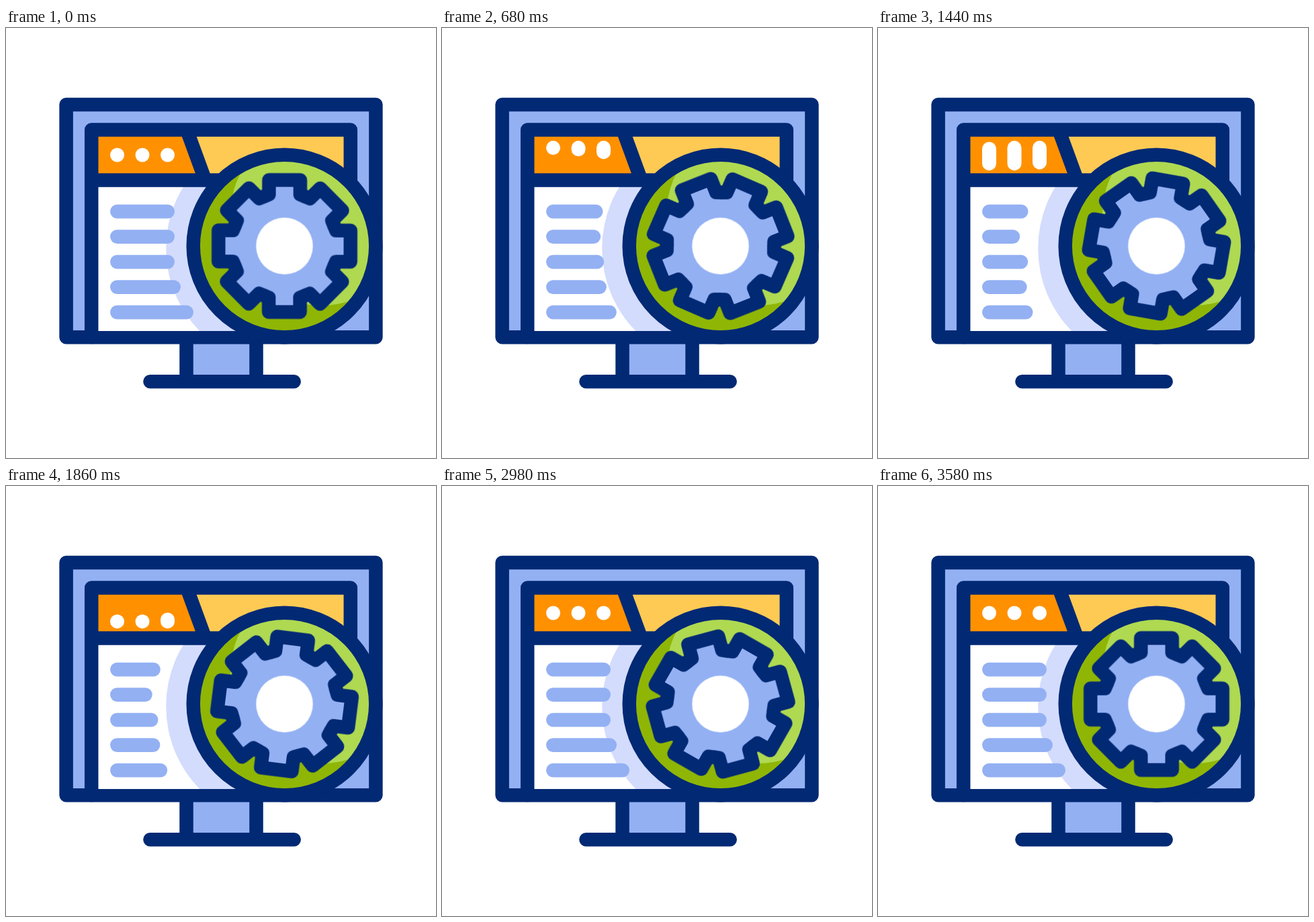
These frames come from a looping animation (640x640 px, 3600 ms). An HTML page without scripts:

```html
<!DOCTYPE html>
<html lang="en">
<head>
<meta charset="utf-8">
<title>Settings monitor</title>
<style>
  html, body { margin: 0; width: 100%; height: 100%; overflow: hidden; background: #fff; }
  svg { display: block; width: 100vw; height: 100vh; }

  .ink { stroke: #022974; stroke-width: 20.5; stroke-linejoin: round; stroke-linecap: round; fill: none; }
  .blue { fill: #93b0f3; }
  .dots { fill: #fff; }

  .gear { animation: spin 3.6s linear infinite; }
  .dots rect, .lines rect { animation: 3.6s cubic-bezier(.333, 0, .667, 1) infinite; }
  .dots rect { animation-name: hop; }
  .dots rect:nth-child(2) { animation-delay: 80ms; }
  .dots rect:nth-child(3) { animation-delay: 160ms; }
  .lines rect:nth-child(1) { animation-name: line1; }
  .lines rect:nth-child(2) { animation-name: line2; }
  .lines rect:nth-child(3) { animation-name: line3; }
  .lines rect:nth-child(4) { animation-name: line4; }
  .lines rect:nth-child(5) { animation-name: line5; }

  @keyframes spin { 99.44%, 100% { transform: rotate(360deg); } }

  /* The leading edge moves first, the trailing edge catches up. */
  @keyframes hop {
    0%, 76.8%, 100% { y: 178.5px; height: 21px; }
    10.8% { y: 167.8px; height: 31.7px; }
    19.2%, 23.3% { y: 167.8px; height: 21px; }
    38.1% { y: 167.8px; height: 44.4px; }
    49.7%, 57.3% { y: 191.2px; height: 21px; }
  }

  @keyframes line1 { 0%, 2.8%, 80%, 100% { width: 96px; } 38.9% { width: 68.5px; } }
  @keyframes line2 { 0%, 2.8%, 80%, 100% { width: 96px; } 41.7% { width: 56px; } }
  @keyframes line3 { 0%, 2.8%, 80%, 100% { width: 96px; } 43.3% { width: 67.7px; } }
  @keyframes line4 { 0%, 2.8%, 80%, 100% { width: 105px; } 40.3% { width: 66.7px; } }
  @keyframes line5 { 0%, 2.8%, 80%, 100% { width: 124px; } 40.3% { width: 75.5px; } }
</style>
</head>
<body>
<svg viewBox="0 0 640 640">
  <defs>
    <path id="tooth" class="ink" style="fill:#93b0f3"
      d="M-30.52-73.68L-23.25-76.7V-98.25H23.25V-76.7L30.52-73.68"/>
    <clipPath id="page"><rect x="137" y="236" width="277" height="215"/></clipPath>
    <clipPath id="disc"><circle cx="414.5" cy="324.5" r="130"/></clipPath>
  </defs>

  <!-- stand -->
  <path class="blue" d="M268.5 460H372.5V526H268.5Z"/>
  <path class="ink" d="M268.5 460V526M372.5 460V526M214.4 526.2H428.7"/>

  <!-- monitor -->
  <rect class="ink" style="fill:#93b0f3" x="89.6" y="114" width="460.8" height="346.3"/>

  <!-- browser window -->
  <path fill="#ff9100" d="M127 152H270L295 226H127Z"/>
  <path fill="#ffca54" d="M270 152H512V226H295Z"/>
  <rect x="127" y="226" width="287" height="225" fill="#fff"/>
  <circle cx="414.5" cy="328" r="176.3" fill="#d3dcfd" clip-path="url(#page)"/>
  <path class="ink" d="M127.2 460V151.6H512.8V230M127.2 226.4H320M269.2 152L296.3 226"/>

  <g class="dots">
    <rect x="155" y="178.5" width="21" height="21" rx="10.5"/>
    <rect x="192.5" y="178.5" width="21" height="21" rx="10.5"/>
    <rect x="230" y="178.5" width="21" height="21" rx="10.5"/>
  </g>

  <g class="lines blue">
    <rect x="155" y="262.8" width="96" height="20.6" rx="10.3"/>
    <rect x="155" y="300.3" width="96" height="20.6" rx="10.3"/>
    <rect x="155" y="337.8" width="96" height="20.6" rx="10.3"/>
    <rect x="155" y="375.3" width="105" height="20.6" rx="10.3"/>
    <rect x="155" y="412.8" width="124" height="20.6" rx="10.3"/>
  </g>

  <!-- badge -->
  <g clip-path="url(#disc)">
    <circle cx="414.5" cy="324.5" r="130" fill="#8fb605"/>
    <circle cx="469" cy="278" r="135" fill="#afd951"/>
  </g>
  <circle class="ink" cx="414.5" cy="324.5" r="135.8"/>

  <g transform="translate(414.5 324.5)">
    <g class="gear">
      <circle class="blue" r="76"/>
      <use href="#tooth"/>
      <use href="#tooth" transform="rotate(45)"/>
      <use href="#tooth" transform="rotate(90)"/>
      <use href="#tooth" transform="rotate(135)"/>
      <use href="#tooth" transform="rotate(180)"/>
      <use href="#tooth" transform="rotate(225)"/>
      <use href="#tooth" transform="rotate(270)"/>
      <use href="#tooth" transform="rotate(315)"/>
    </g>
    <circle r="42.3" fill="#fff"/>
  </g>
</svg>
</body>
</html>
```
